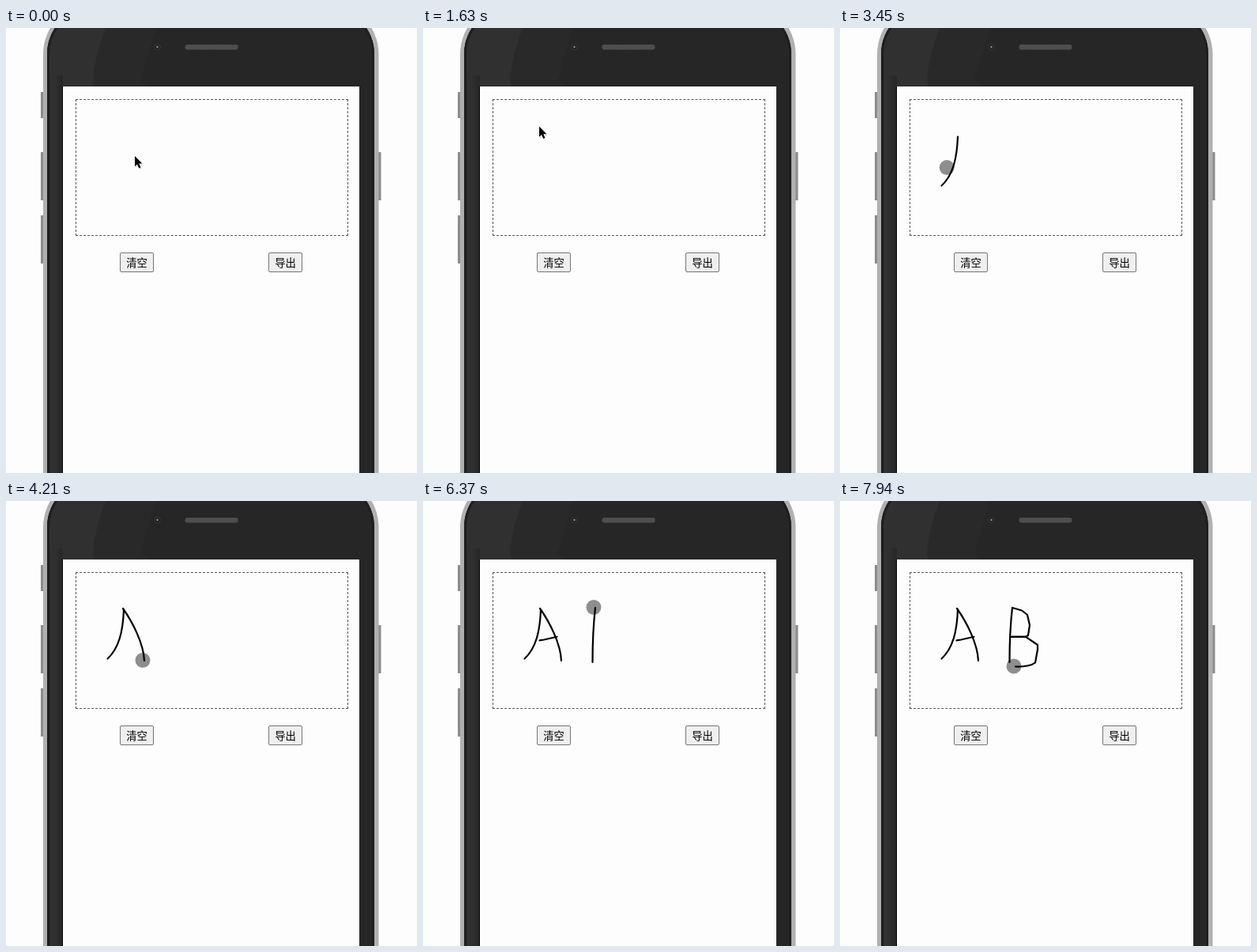
An HTML page that plays this animation: 520x563 px, repeating every 8000 ms.

```html
<!DOCTYPE html>
<html lang="zh-CN">
<head>
<meta charset="utf-8">
<title>手写板</title>
<style>
  html, body { margin: 0; width: 100%; height: 100%; overflow: hidden; background: #fdfdfd; }
  svg, div { position: absolute; box-sizing: border-box; }
  svg { left: 0; top: 0; }
  .pad { left: 88px; top: 90px; width: 345px; height: 173px; border: 1px dashed #555; }
  .btn {
    top: 284px; width: 43px; height: 25px; border: 1px solid #767676; border-radius: 2px;
    background: #efefef; color: #000; text-align: center; white-space: nowrap;
    font: 500 13.333px/23px "Noto Sans CJK SC", "Noto Sans CJK", sans-serif;
  }
  #gestures { fill: none; stroke-width: 2.2; stroke-linecap: round; stroke-linejoin: round; }
  .pen { stroke: #000; }
</style>
</head>
<body>
<svg width="520" height="563">
  <defs>
    <pattern id="mesh" width="2" height="2" patternUnits="userSpaceOnUse">
      <path fill="#3c3c3c" d="M0 0h2v2h-2z"/>
      <path fill="#606060" d="M0 0h1v1h-1zM1 1h1v1h-1z"/>
    </pattern>
    <linearGradient id="side">
      <stop offset="0" stop-color="#262626"/>
      <stop offset=".3" stop-color="#323232"/>
      <stop offset="1" stop-color="#272727"/>
    </linearGradient>
    <clipPath id="face"><rect x="52" y="-27" width="414" height="700" rx="60"/></clipPath>
  </defs>
  <path fill="#8c8c8c" d="M44 81h5v33h-5zM44 157h5v61h-5zM44 237h5v61h-5zM470 157h4.500v61h-4.500z"/>
  <rect x="47" y="-32" width="424.500" height="700" rx="65" fill="#b0b0b0"/>
  <g clip-path="url(#face)">
    <path fill="#262626" d="M52-30h415v600h-415z"/>
    <path fill="#292929" d="M122 0H190L170 66L180 74H72Z"/>
    <path fill="#303030" d="M52 0H126Q112 36 110 66L112 74H52Z"/>
    <path fill="url(#side)" d="M52 60h20v503h-20z"/>
    <rect x="52" y="-27" width="414" height="700" rx="60" fill="none" stroke="#1f1f1f" stroke-width="6"/>
  </g>
  <circle cx="191.500" cy="24" r="3.500" fill="#181818" stroke="#444" stroke-width=".8"/>
  <circle cx="191.500" cy="24" r="1.400" fill="#808080"/>
  <rect x="226.500" y="21" width="67" height="6.500" rx="3" fill="url(#mesh)"/>
  <path fill="#000" d="M71 74h1v489h-1z"/>
  <path fill="#fdfdfd" d="M72 74h375v489h-375z"/>
</svg>
<div class="pad"></div>
<div class="btn" style="left:144px">清空</div>
<div class="btn" style="left:332px">导出</div>
<svg width="520" height="563">
  <!-- Pointer paths in order; those with class "pen" leave ink. Times in ms. -->
  <g id="gestures">
    <path data-from="60" data-to="820" d="M163 162C190 160 180 140 150 130"/>
    <path data-from="880" data-to="1340" d="M150 130L147 119"/>
    <path data-from="1520" data-to="1860" d="M147 122V131"/>

    <path class="pen" data-from="2190" data-to="3230" d="M149 137.500C148 165 143 186 128.500 199.500"/>
    <path data-from="3230" data-to="3800" d="M128.500 199.500Q142 168 148 136"/>
    <path class="pen" data-from="3800" data-to="4180" d="M148 136C160 153 174 180 175 202"/>
    <path data-from="4240" data-to="4620" d="M175 202Q160 198 147.500 180"/>
    <path class="pen" data-from="4680" data-to="5090" d="M147.500 176.300L153 175.500L169.500 171.800"/>

    <path data-from="5270" data-to="5680" d="M167 172C200 170 245 150 218 135"/>
    <path class="pen" data-from="5680" data-to="6030" d="M218 135Q214.500 165 214.500 204"/>
    <path data-from="6030" data-to="6370" d="M214.500 204Q207 165 218 135"/>
    <path class="pen" data-from="6550" data-to="7060" d="M218 135L230 138.500L237 144L240 157L238 170L235 171.800H217"/>
    <path class="pen" data-from="7060" data-to="7940" d="M217 171.800H235L250 182V188L247 204.500Q240 210 222 209.500"/>
  </g>
  <circle id="touch" cx="-2" cy="-.5" r="9.500" fill-opacity=".44"/>
  <g id="arrow">
    <path d="M1 2V15L4 12.500L6.200 17L8.500 16L6.500 11.500H10.500Z" opacity=".15"/>
    <path d="M0 0V13.300L3 10.500L5.200 15.400L7.500 14.400L5.300 9.600H9.400Z" stroke="#fff" stroke-width="1.600" paint-order="stroke"/>
  </g>
</svg>
<script>
const LOOP = 8000, STEP = 60, TOUCH_AT = 2190;
const touch = document.getElementById("touch");
const arrow = document.getElementById("arrow");

const gestures = [...document.querySelectorAll("#gestures path")].map(path => {
  path.setAttribute("pathLength", 1);
  return { path, from: +path.dataset.from, to: +path.dataset.to, length: path.getTotalLength() };
});

// Share of a gesture done at time t, in even steps of about STEP ms.
function progress({ from, to }, t) {
  if (t < from) return 0;
  const steps = Math.round((to - from) / STEP);
  const done = Math.floor((t - from) / (to - from) * steps);
  return Math.min(1, (done + 1) / (steps + 1));
}

function render(t) {
  let current = gestures[0];
  for (const g of gestures) {
    const share = progress(g, t);
    g.path.style.visibility = share ? "visible" : "hidden";
    g.path.style.strokeDasharray = `${share} 2`;
    if (share) current = g;
  }
  const { x, y } = current.path.getPointAtLength(progress(current, t) * current.length);
  const touching = t >= TOUCH_AT;
  for (const pointer of [touch, arrow]) {
    pointer.setAttribute("transform", `translate(${x} ${y})`);
    pointer.style.display = touching === (pointer === touch) ? "" : "none";
  }
}

const begin = performance.now();
function frame() {
  render((performance.now() - begin) % LOOP);
  requestAnimationFrame(frame);
}
frame();
</script>
</body>
</html>
```
